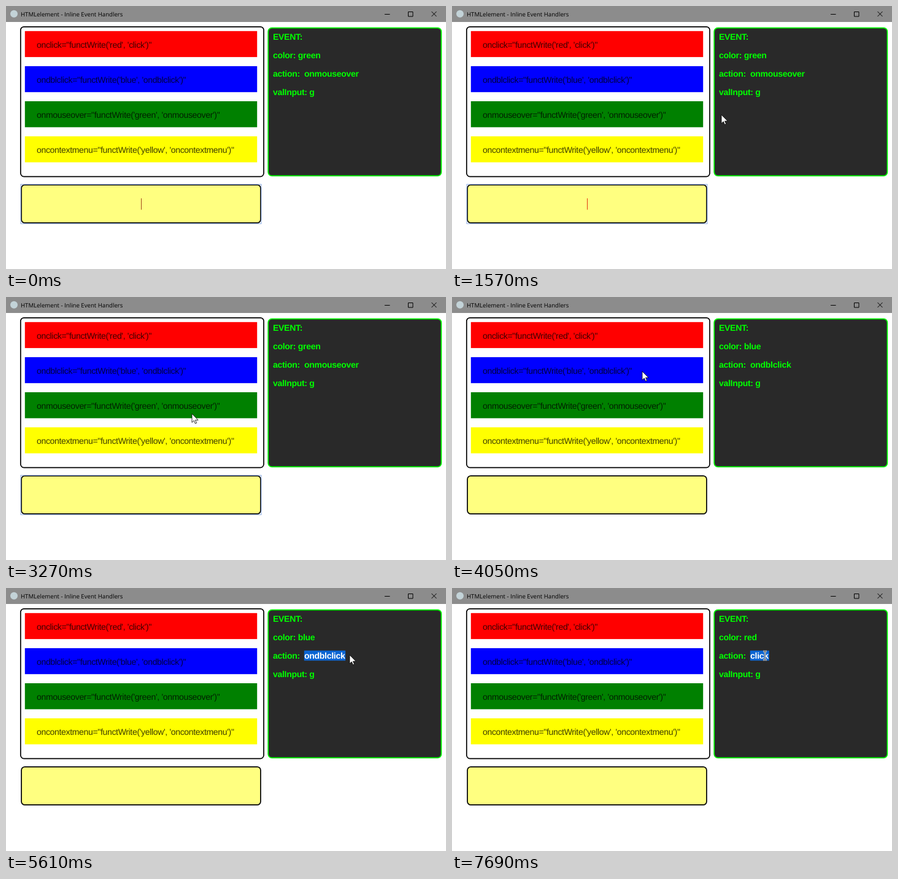
An HTML page for the animation above (8 s loop, 717 px wide and 428 px high).

```html
<!DOCTYPE html>
<html lang="en">
<head>
<meta charset="utf-8">
<title>Inline Event Handlers</title>
<style>
  html, body { margin: 0; width: 100%; height: 100%; overflow: hidden; background: #fff; }
  svg { display: block; width: 717px; height: 428px; }
  text { white-space: pre; text-rendering: geometricPrecision; }
  .title { font: 9.65px "Open Sans", "Noto Sans", sans-serif; }
  .label, .out { font: 14px "Liberation Sans", Arial, sans-serif; letter-spacing: -.33px; }
  .label { fill-opacity: .76; }
  .out { font-weight: bold; fill: #0f0; letter-spacing: -.29px; }
  .frame { stroke: #000; stroke-width: 1.7; }
</style>
</head>
<body>
<svg viewBox="0 0 717 428">
  <rect width="717" height="26" fill="#8c8c8c"/>
  <circle cx="13" cy="12.8" r="6" fill="#c3d3d8"/>
  <text class="title" x="24" y="16.6">HTMLelement - Inline Event Handlers</text>
  <path d="M617 13.5H625.5M655.5 9.5H663V17H655.5ZM693.5 9L701.5 17M701.5 9L693.5 17" fill="none" stroke="#000"/>

  <rect class="frame" x="23.8" y="33.8" width="396.2" height="243.8" rx="5.5" fill="#fff"/>
  <g id="bars"></g>
  <rect id="lineEnd" width="4.6" height="16"/>

  <rect x="427.2" y="35.7" width="282.2" height="240.6" rx="6" fill="#292929" stroke="#0f0" stroke-width="1.7"/>
  <rect id="mark" x="485.8" y="101.8" height="16.4" fill="#0a64d2"/>
  <g class="out">
    <text x="435" y="54.5">EVENT:</text>
    <text x="435" y="84.7" id="color"></text>
    <text x="435" y="114.9">action:  <tspan id="action"></tspan></text>
    <text x="435" y="145.1">valInput: g</text>
  </g>

  <rect class="frame" x="25.1" y="291.1" width="389.8" height="61.8" rx="5.5" fill="#ffff80"/>
  <rect id="focus" x="24" y="290.2" width="392" height="64" fill="none" stroke="#7fa3e0" stroke-width=".9"/>
  <rect id="caret" x="220" y="313" width="1" height="18.5"/>

  <path id="arrow" d="M0 0V14.2L3.3 11.1L5.4 16L7.6 15L5.5 10.3H10.1Z" fill="#fff" stroke="#000" stroke-width=".8"/>
  <g id="beam" fill="none">
    <path id="beamLine" d="M-3 -7H-1L0 -6L1 -7H3M0 -6V6M-3 7H-1L0 6L1 7H3" stroke="#fff" stroke-width="2.4"/>
    <use href="#beamLine" style="display:none"/>
    <path d="M-3 -7H3M0 -7V7M-3 7H3" stroke="#222" stroke-width=".9"/>
  </g>
</svg>
<script>
const LOOP = 8000, STEP = 130.4, BLINK = 530;
const $ = id => document.getElementById(id);
const show = (id, on) => $(id).setAttribute("visibility", on ? "visible" : "hidden");
const set = (id, attrs) => { for (const k in attrs) $(id).setAttribute(k, attrs[k]); };

const handlers = [
  ["onclick", "red", "click"],
  ["ondblclick", "blue", "ondblclick"],
  ["onmouseover", "green", "onmouseover"],
  ["oncontextmenu", "yellow", "oncontextmenu"]
];
$("bars").innerHTML = handlers.map(([name, color, action], i) => {
  const y = 40.8 + i * 57.1;
  return `<rect x="30.8" y="${y}" width="378.4" height="42.3" fill="${color}"/>` +
    `<text class="label" x="50" y="${y + 27}">${name}="functWrite('${color}', '${action}')"</text>`;
}).join("");

// Steps at which the user does something
const ENTER = 5, FOCUS_BLUE = 29, FIRE_BLUE = 31, MARK_BLUE = 39, FIRE_RED = 50, REACH_RED = 57, MARK_RED = 59;

// Pointer stops: arrival step, departure step, x, y
const stops = [
  [ENTER, ENTER, 598, 385],
  [8, 8, 528, 349],
  [12, 12, 439, 177],
  [15, 15, 355, 166],
  [25, 25, 303, 190],
  [28, 32, 310, 121],
  [35, 35, 494, 89],
  [38, MARK_BLUE, 520, 110],
  [41, 43, 560, 109],
  [45, 46, 347, 117],
  [48, 53, 345, 62],
  [REACH_RED, Infinity, 510, 110]
];

function pointerAt(n) {
  const i = stops.findIndex(([, leave]) => n <= leave);
  const [arrive, , x1, y1] = stops[i];
  if (n >= arrive) return [x1, y1];
  const [, leave, x0, y0] = stops[i - 1];
  const k = (n - leave) / (arrive - leave);
  return [x0 + (x1 - x0) * k, y0 + (y1 - y0) * k];
}

function draw(t) {
  // The screen was sampled in steps, so the picture holds between them
  const n = Math.floor(t / STEP + 0.04);
  const within = (a, b) => n >= a && n < b;

  const focused = n < FOCUS_BLUE;
  show("focus", focused);
  show("caret", focused && (n < 1 || Math.floor((n - 1) * STEP / BLINK) % 2 === 0));
  set("caret", { fill: n < 1 ? "#a34a1c" : "#e23a12" });

  const [, color, action] = handlers[n < FIRE_BLUE ? 2 : n < FIRE_RED ? 1 : 0];
  $("color").textContent = "color: " + color;
  $("action").textContent = action;

  // A double click also selects the line end beside the label
  const onRed = within(FIRE_RED + 1, REACH_RED);
  show("lineEnd", onRed || within(FIRE_BLUE + 1, MARK_BLUE));
  set("lineEnd", onRed ? { x: 240.2, y: 55, fill: "#4060d0" } : { x: 296.9, y: 112, fill: "#0a5cf0" });

  const marked = within(MARK_BLUE, FIRE_RED) || n >= MARK_RED;
  show("mark", marked);
  set("mark", { width: n < FIRE_RED ? 67.4 : 31 });
  $("action").setAttribute("fill", marked ? "#fff" : "#0f0");

  const overText = within(38, 41) || n >= REACH_RED;
  show("arrow", n >= ENTER && !overText);
  show("beam", overText);
  if (n >= ENTER) set(overText ? "beam" : "arrow", { transform: `translate(${pointerAt(n)})` });
}

const start = performance.now();
function frame() {
  draw((performance.now() - start) % LOOP);
  requestAnimationFrame(frame);
}
frame();
</script>
</body>
</html>
```
